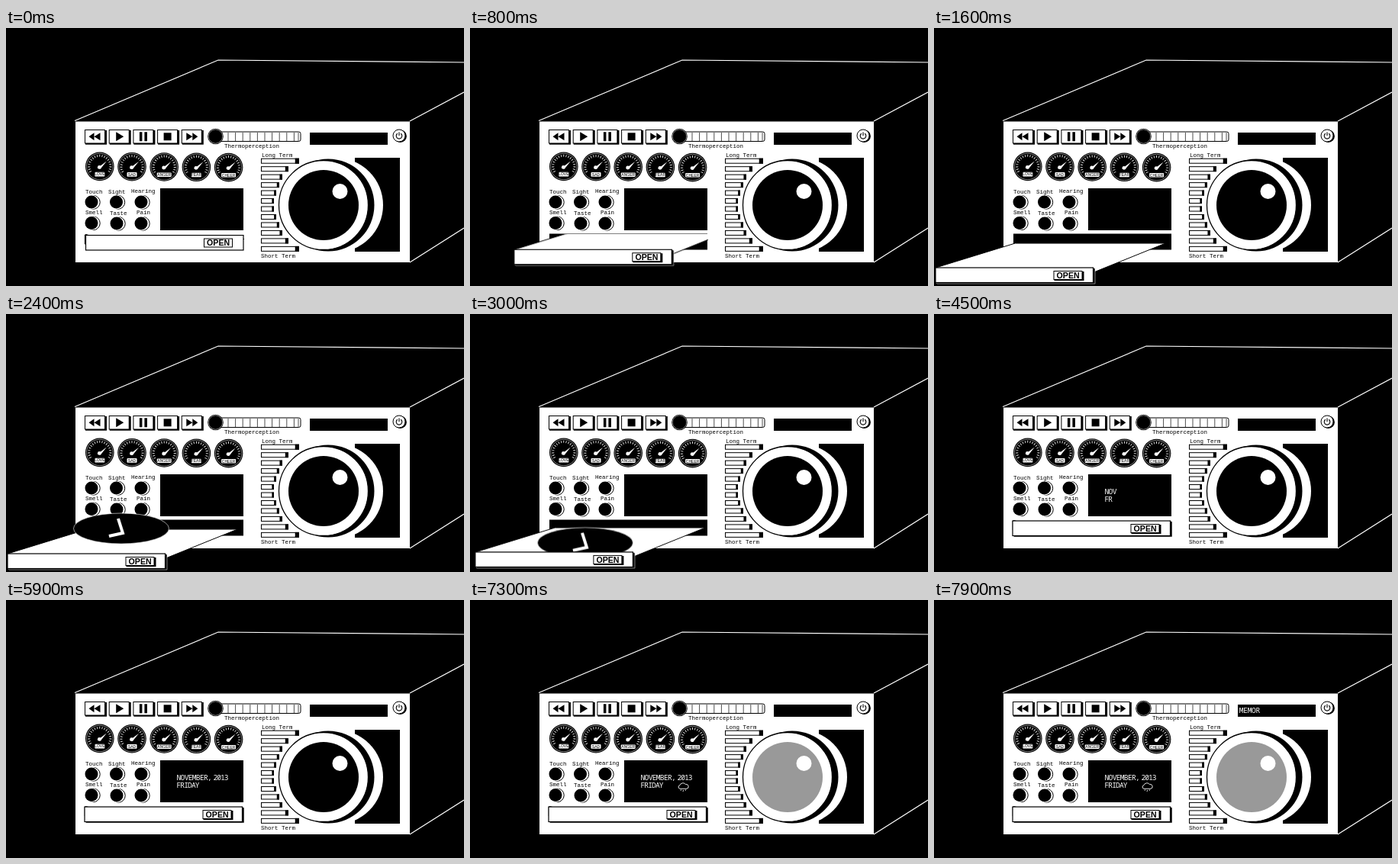
These frames come from a looping animation (600x338 px, 8000 ms). An HTML page:

```html
<!DOCTYPE html>
<html lang="en">
<head>
<meta charset="utf-8">
<title>Memory player</title>
<style>
html, body { margin: 0; width: 100%; height: 100%; overflow: hidden; background: #000; }
svg { display: block; width: 100vw; height: 100vh; }
.label { font: 7.5px "Liberation Mono", monospace; fill: #000; }
.tag { font: 5px "Liberation Sans", sans-serif; text-anchor: middle; fill: #000; }
.open { font: bold 10.6px "Liberation Sans", sans-serif; text-anchor: middle; fill: #000; }
.led { font: 300 9.6px "Noto Sans Mono", "DejaVu Sans Mono", monospace; fill: #fff; }
.box { fill: #fff; stroke: #000; }
.line { fill: none; stroke: #fff; stroke-width: 1.2; }

.slot, .raised, .flat, .tray, .drop, .ride, .held, .cloud, .lens { animation: 8s linear infinite; }
.slot { animation-name: slot; animation-timing-function: step-end; }
.raised { animation-name: raised; animation-timing-function: step-end; }
.flat { animation-name: flat; animation-timing-function: step-end; }
.held { animation-name: held; animation-timing-function: step-end; }
.cloud { animation-name: cloud; animation-timing-function: step-end; }
.tray { animation-name: tray; }
.drop { animation-name: drop, early; animation-timing-function: linear, step-end; }
.ride { animation-name: ride, late; animation-timing-function: linear, step-end; }
.lens { animation-name: lens; }

@keyframes slot { 0%, 52.5% { visibility: hidden } 1.25% { visibility: visible } 100% { visibility: hidden } }
@keyframes raised { 0% { visibility: hidden } 1.25%, 100% { visibility: visible } }
@keyframes flat { 0% { transform: translate(1.5px, .5px) } 1.25%, 100% { transform: none } }
@keyframes held { 0%, 87.5%, 100% { transform: none } 83.75% { transform: translate(1.5px, 1px) } }
@keyframes cloud { 0% { visibility: hidden } 78.75%, 100% { visibility: visible } }
@keyframes tray {
  0%, 1.25% { transform: none; animation-timing-function: cubic-bezier(.33, .05, .67, .4) }
  15%, 36.75% { transform: translate(-101px, 43px) }
  52.5%, 100% { transform: none }
}
@keyframes drop {
  0%, 25% { transform: translate(-65px, 280px); animation-timing-function: ease-out }
  31.25% { transform: translate(165px, 281px); animation-timing-function: ease-in-out }
  35%, 100% { transform: translate(148px, 302px) }
}
@keyframes ride {
  0%, 36.75% { transform: translate(148px, 302px) }
  52.5%, 100% { transform: translate(208px, 255px) }
}
@keyframes early { 0%, 36.75% { visibility: hidden } 25% { visibility: visible } 100% { visibility: hidden } }
@keyframes late { 0%, 52.5% { visibility: hidden } 36.75% { visibility: visible } 100% { visibility: hidden } }
@keyframes lens { 0%, 86.5% { fill: #000 } 91%, 100% { fill: #999 } }
</style>
</head>
<body>
<svg id="stage" viewBox="0 0 600 338" preserveAspectRatio="none"></svg>
<script>
const LOOP = 8000;
const stage = document.getElementById('stage');

const rect = (x, y, w, h, attrs = '') => `<rect x="${x}" y="${y}" width="${w}" height="${h}" ${attrs}/>`;
const disc = (x, y, r, attrs = '') => `<circle cx="${x}" cy="${y}" r="${r}" ${attrs}/>`;
const path = (d, attrs = '') => `<path d="${d}" ${attrs}/>`;
const text = (x, y, s, cls = 'label') => `<text x="${x}" y="${y}" class="${cls}">${s}</text>`;

function cabinet() {
  return path('M90 121.5L278 42L600 45M529 122L600 84M529 307L600 262', 'class="line"') +
    rect(91, 122.5, 438, 184.5, 'fill="#fff"');
}

function transport() {
  const icons = [
    'M-1 -5V5L-8 0ZM7 -5V5L-1 0Z',
    'M-4 -6V6L6 0Z',
    'M-5 -6H-1.5V6H-5ZM1.5 -6H5V6H1.5Z',
    'M-5 -5H5V5H-5Z',
    'M1 -5V5L8 0ZM-7 -5V5L1 0Z'
  ];
  return icons.map((d, i) => {
    const x = 103.5 + i * 31.7;
    const face = rect(x, 133.5, 26, 17.5, 'class="box"') +
      path(d, `transform="translate(${x + 13} 142.3)"`);
    return rect(x + .5, 134, 28, 18.7) + `<g${i === 1 ? ' class="held"' : ''}>${face}</g>`;
  }).join('');
}

function thermometer() {
  let s = rect(276, 136, 110, 12.5, 'rx="2.5" class="box"');
  for (let x = 291; x < 384; x += 9.6) s += path(`M${x} 137V148`, 'stroke="#000" stroke-width=".7"');
  return s + path('M383 137V148', 'stroke="#000" stroke-width=".7"') +
    disc(274.5, 142, 10.3) + disc(274.5, 142, 9.2, 'fill="none" stroke="#fff" stroke-width=".5"') +
    text(286, 156.5, 'Thermoperception');
}

function gauges() {
  return ['LOVE', 'SAD', 'ANGER', 'FEAR', 'CHEER'].map((name, i) => {
    const w = name.length > 4 ? 19 : 13;
    return `<g transform="translate(${122.8 + i * 42.2} ${181.4 + i * .3})">` +
      disc(0, 0, 18.8) + disc(0, 0, 17.3, 'fill="none" stroke="#fff" stroke-width=".5"') +
      path('M-12.1 7A14 14 0 1 1 12.1 7', 'fill="none" stroke="#fff" stroke-width="3" stroke-dasharray=".8 2.4"') +
      path('M-3 2L9 -7L1 3Z', 'fill="#fff"') + disc(-.5, 1, 2.4, 'fill="#fff"') +
      rect(-w / 2, 7.4, w, 5.6, 'rx="1" fill="#fff"') + text(0, 12.1, name, 'tag') + '</g>';
  }).join('');
}

function knobs() {
  const items = [
    [112, 228, 'Touch', 104, 217], [144.5, 228, 'Sight', 134, 217], [177, 228, 'Hearing', 164, 216],
    [112, 255.5, 'Smell', 104, 244], [145, 256, 'Taste', 136, 245], [177, 256, 'Pain', 171, 244]
  ];
  return items.map(([x, y, name, tx, ty]) =>
    disc(x + 2.3, y + .3, 8.9, 'class="box"') + disc(x, y, 9.4, 'fill="#fff"') +
    disc(x, y, 8.5) + text(tx, ty, name)).join('');
}

function memoryBars() {
  const widths = [50, 36, 28, 24, 20, 17];
  let s = text(335, 169, 'Long Term') + text(334, 301, 'Short Term');
  for (let i = 0; i < 12; i++) {
    const w = widths[Math.min(i, 11 - i)], y = 171.2 + i * 10.47, tip = 1.3 + w * .08;
    s += rect(334.5, y, w - 1, 6, 'class="box"') + rect(334 + w - tip, y - .5, tip, 7);
  }
  return s;
}

function wheel() {
  return rect(457, 170, 59, 123) + disc(432, 232, 62, 'fill="#fff"') +
    disc(422, 232, 60.5) + disc(416, 232, 58.5, 'class="box" stroke-width="1.3"') +
    disc(416, 232, 46, 'class="lens"') + disc(437.5, 214, 10, 'fill="#fff"');
}

function power() {
  return disc(516.6, 141.7, 8.3) + disc(515, 141, 8, 'class="box"') +
    path('M512.8 138.2A3.8 3.8 0 1 0 517.2 138.2M515 136.5V141', 'fill="none" stroke="#000" stroke-width="1.1"');
}

function screens() {
  return rect(398, 137, 102, 16) + rect(202, 210, 109, 55) +
    '<g class="cloud" fill="none" stroke="#fff" stroke-width=".9">' +
    path('M275 247.3A2.4 2.4 0 0 1 275 242.6A4.2 4 0 0 1 282.5 241.6A2.9 2.9 0 0 1 284 247.3Z') +
    path('M276.5 248.5L276 250M279.5 249L279 251M282.5 248.5L282 250') + '</g>';
}

function tray() {
  const plate = '<g transform="translate(0 302)"></g>';
  const record = '<ellipse rx="62.5" ry="20" stroke="#fff" stroke-width=".6"/>' +
    path('M-4 -13L2 6L-16 10', 'fill="none" stroke="#fff" stroke-width="4"');
  const top = path('M0 0L104 -32H301L207 6V12H0Z', 'class="box" transform="translate(103.3 271)"');
  const front = '<g transform="translate(103 271)"><g class="raised">' +
    path('M206 0L209 1V21H2L0 19Z', 'stroke="#fff" stroke-width=".5"') + '</g><g class="flat">' +
    rect(0, 0, 206.5, 19.5, 'class="box" stroke-width="1.2"') +
    '<g class="raised">' + rect(155.5, 5, 39, 12) + '</g>' +
    rect(155, 4.5, 37, 11, 'class="box"') + text(173.6, 13.9, 'OPEN', 'open') + '</g></g>';
  return '<clipPath id="mouth">' + rect(-100, 270, 411.5, 70) + '</clipPath>' +
    rect(104, 269.5, 207, 21, 'class="slot"') +
    `<g clip-path="url(#mouth)"><g class="tray">${top}</g><g class="ride">${record}</g></g>` +
    `<g class="drop">${record}</g><g class="tray">${front}</g>`;
}

// Each character of a readout appears at its own moment.
function type(x, y, spacing, word, times) {
  const line = document.createElementNS(stage.namespaceURI, 'text');
  line.setAttribute('x', x);
  line.setAttribute('y', y);
  line.setAttribute('class', 'led');
  line.style.letterSpacing = spacing + 'px';
  stage.append(line);
  [...word].forEach((char, i) => {
    const span = document.createElementNS(stage.namespaceURI, 'tspan');
    span.textContent = char;
    line.append(span);
    const offset = (times[i] - 40) / LOOP;
    span.animate([
      { fillOpacity: 0 }, { fillOpacity: 0, offset }, { fillOpacity: 1, offset }, { fillOpacity: 1 }
    ], { duration: LOOP, iterations: Infinity });
  });
}

stage.innerHTML = [cabinet, transport, thermometer, gauges, knobs, memoryBars, wheel, power, screens, tray]
  .map(draw => draw()).join('');

type(223.5, 236, -.7, 'NOVEMBER,', [4300, 4400, 4500, 4800, 4800, 4900, 4900, 5000, 5000]);
type(271.5, 236, -1, '2013', [5200, 5300, 5400, 5400]);
type(223.5, 246, -.9, 'FRIDAY', [4400, 4500, 4600, 4800, 4900, 5000]);
type(399.7, 148.4, -.3, 'MEMOR', [7500, 7600, 7700, 7800, 7900]);
</script>
</body>
</html>
```
